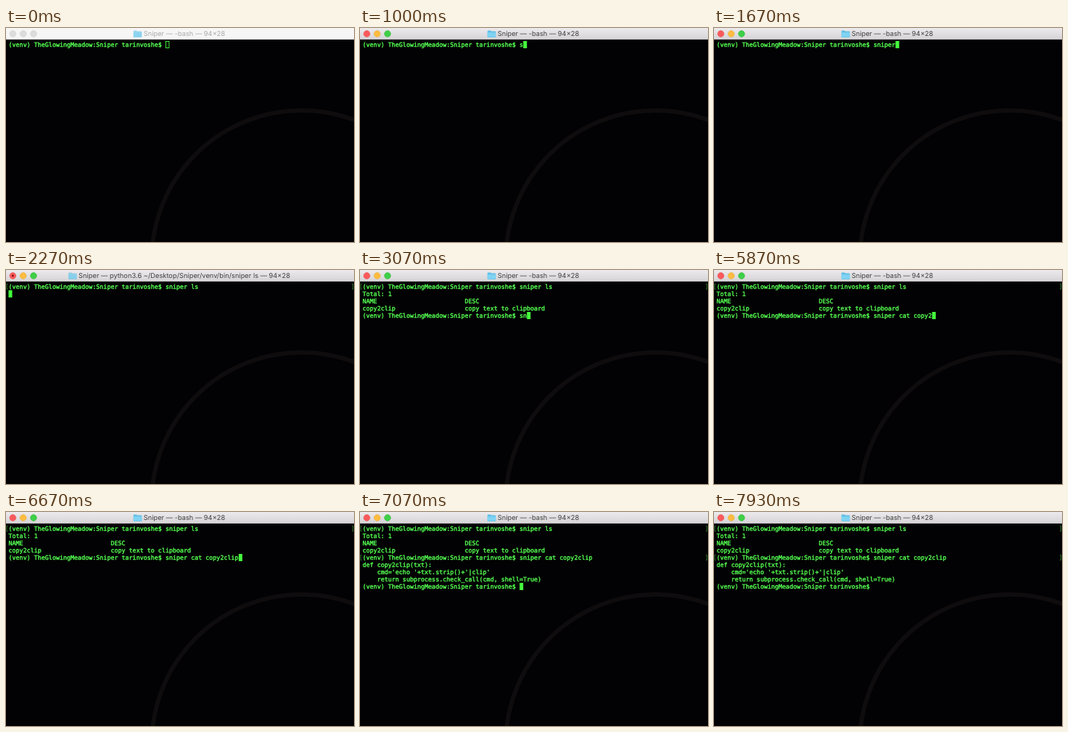
An HTML page with a canvas that plays this animation: 480 by 296 pixels, repeating every 8000 ms.

```html
<!DOCTYPE html>
<html lang="en">
<head>
<meta charset="utf-8">
<title>Terminal</title>
<style>
  html, body { margin: 0; width: 100%; height: 100%; overflow: hidden; background: #000; }
  canvas { display: block; width: 480px; height: 296px; }
</style>
</head>
<body>
<canvas id="stage" width="480" height="296"></canvas>
<script>
const ctx = document.getElementById('stage').getContext('2d');
const W = 480, H = 296, LOOP = 8000;
const FOCUS = 70, BLINK = 600;
const BAR = 16, LEFT = 3.5, TOP = 18, ROW = 10, SIZE = 8.37, CELL = SIZE * 0.602;
const GREEN = '#55fe52', CURSOR = '#45fe3c', MARK = '#2a6e28';
const PROMPT = '(venv) TheGlowingMeadow:Sniper tarinvoshe$ ';

// Evenly spaced key times
const keys = (start, step, count) => Array.from({ length: count }, (_, i) => start + i * step);

const commands = [
  {
    text: 'sniper ls', start: 0, enter: 2200, done: 2465,
    keys: keys(868, 140, 9),
    output: [
      'Total: 1',
      'NAME'.padEnd(28) + 'DESC',
      'copy2clip'.padEnd(28) + 'copy text to clipboard'
    ]
  },
  {
    text: 'sniper cat copy2clip', start: 2465, enter: 6730, done: 6998,
    keys: [...keys(2868, 125, 11), 4800, 5000, 5265, 5465, 5730, ...keys(6130, 135, 4)],
    output: [
      'def copy2clip(txt):',
      "    cmd='echo '+txt.strip()+'|clip'",
      '    return subprocess.check_call(cmd, shell=True)'
    ]
  },
  { text: '', start: 6998, enter: Infinity, done: Infinity, keys: [], output: [] }
];

const activity = [FOCUS, ...commands.flatMap(c => [c.start, ...c.keys, c.enter])]
  .sort((a, b) => a - b);

// Screen contents at time t
function screenAt(t) {
  const lines = [], marks = [];
  let running = null;
  for (const c of commands) {
    if (t < c.start) break;
    const typed = c.keys.filter(k => k <= t).length;
    if (t >= c.enter) marks.push(lines.length);
    lines.push(PROMPT + c.text.slice(0, typed));
    if (t >= c.done) lines.push(...c.output);
    else if (t >= c.enter) {
      running = c;
      lines.push('');
    }
  }
  return { lines, marks, running };
}

function circle(x, y, r) {
  ctx.beginPath();
  ctx.arc(x, y, r, 0, Math.PI * 2);
}

function drawBackground() {
  ctx.fillStyle = '#020103';
  ctx.fillRect(0, 0, W, H);
  circle(408, 321, 207);
  ctx.strokeStyle = '#0e0c0d';
  ctx.lineWidth = 6;
  ctx.stroke();
}

function drawLight(x, fill, edge) {
  circle(x, 8, 4.4);
  ctx.fillStyle = fill;
  ctx.fill();
  ctx.strokeStyle = edge;
  ctx.lineWidth = 0.5;
  ctx.stroke();
}

function drawFolder(x, alpha) {
  ctx.globalAlpha = alpha;
  ctx.fillStyle = '#5fbfe6';
  ctx.beginPath();
  ctx.roundRect(x, 3.5, 5, 4, 1);
  ctx.roundRect(x, 4.6, 11.5, 8.4, 1);
  ctx.fill();
  ctx.fillStyle = '#7fd3f3';
  ctx.fillRect(x, 6.2, 11.5, 6.2);
  ctx.globalAlpha = 1;
}

function drawTitleBar(active, running) {
  const grad = ctx.createLinearGradient(0, 0, 0, BAR);
  grad.addColorStop(0, active ? '#eceaec' : '#f6f6f6');
  grad.addColorStop(1, active ? '#d5d3d5' : '#f6f6f6');
  ctx.fillStyle = grad;
  ctx.fillRect(0, 0, W, BAR);
  ctx.fillStyle = active ? '#b4b2b4' : '#d4d4d4';
  ctx.fillRect(0, BAR - 0.6, W, 0.6);

  const lights = [['#f95a5c', '#e24a4b'], ['#fdbc40', '#e2a636'], ['#3fcf48', '#31b53a']];
  lights.forEach(([fill, edge], i) =>
    drawLight(9.4 + i * 14.3, active ? fill : '#dcdcdc', active ? edge : '#cdcdcd'));
  if (running) {
    circle(9.4, 8, 1.4);
    ctx.fillStyle = '#7d120e';
    ctx.fill();
  }

  const job = running ? 'python3.6 ~/Desktop/Sniper/venv/bin/' + running.text : '-bash';
  const title = `Sniper — ${job} — 94×28`;
  ctx.font = '9.3px Inter, "Open Sans", sans-serif';
  const gap = 14, width = ctx.measureText(title).width + gap;
  const x = 239 - width / 2;
  drawFolder(x, active && !running ? 1 : 0.6);
  ctx.fillStyle = active ? '#404040' : '#a9a9a9';
  ctx.fillText(title, x + gap, 11.4);
}

function drawMark(row) {
  const y = TOP + row * ROW + 1.5;
  ctx.strokeStyle = MARK;
  ctx.lineWidth = 1;
  ctx.beginPath();
  for (const [edge, tip] of [[1, 2.5], [478.5, 477]]) {
    ctx.moveTo(tip, y);
    ctx.lineTo(edge, y);
    ctx.lineTo(edge, y + 7);
    ctx.lineTo(tip, y + 7);
  }
  ctx.stroke();
}

function drawCursor(t, lines) {
  const row = lines.length - 1;
  const x = LEFT + lines[row].length * CELL, y = TOP + row * ROW;
  if (t < FOCUS) {
    ctx.strokeStyle = CURSOR;
    ctx.lineWidth = 0.9;
    ctx.strokeRect(x + 0.3, y + 0.5, CELL - 0.6, ROW - 1);
    return;
  }
  const last = activity.filter(a => a <= t).pop();
  if (Math.floor((t - last) / BLINK) % 2) return;
  ctx.fillStyle = CURSOR;
  ctx.fillRect(x, y, CELL, ROW);
}

function draw(t) {
  const { lines, marks, running } = screenAt(t);
  ctx.textRendering = 'geometricPrecision';
  drawBackground();
  drawTitleBar(t >= FOCUS, running);
  marks.forEach(drawMark);

  ctx.font = `${SIZE}px "DejaVu Sans Mono", monospace`;
  ctx.fillStyle = ctx.strokeStyle = GREEN;
  ctx.lineWidth = 0.4;
  lines.forEach((line, i) => {
    const y = TOP + i * ROW + 8;
    ctx.fillText(line, LEFT, y);
    ctx.strokeText(line, LEFT, y);
  });
  drawCursor(t, lines);
}

const begin = performance.now();
function tick() {
  draw((performance.now() - begin) % LOOP);
  requestAnimationFrame(tick);
}
tick();
</script>
</body>
</html>
```
